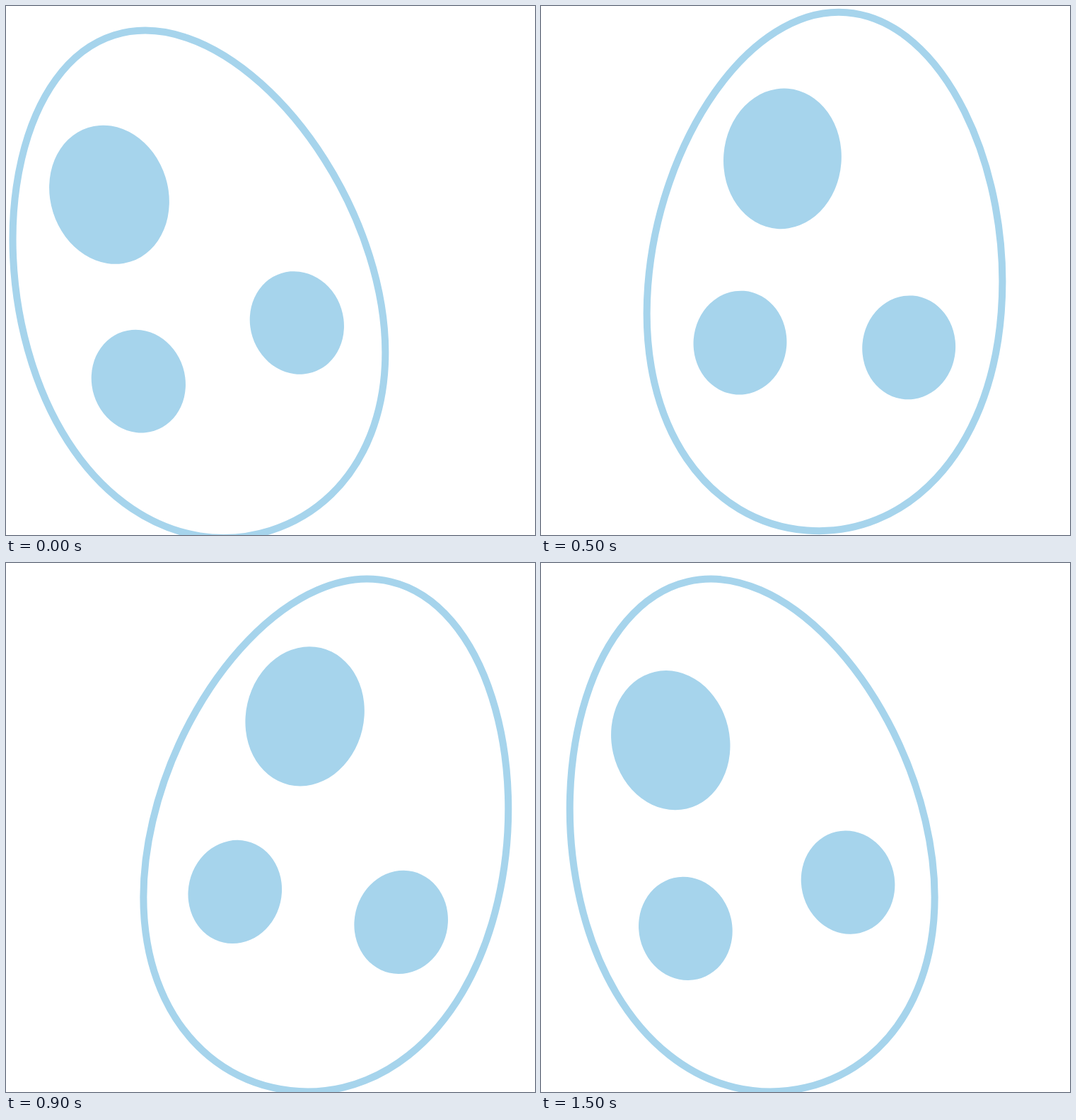
Write an HTML page that moves like this. It is 748x748 px and loops after 1.6 s.

```html
<!DOCTYPE html>
<html lang="en">
<head>
<meta charset="utf-8">
<title>Rocking egg</title>
<style>
  html, body { margin: 0; width: 100%; height: 100%; overflow: hidden; background: #fff; }
  svg { display: block; width: 100vw; height: 100vh; }
</style>
</head>
<body>
<svg viewBox="0 0 748 748">
  <!-- The egg stands on the origin, which is also the pivot -->
  <g id="egg" fill="#a6d4ec">
    <path d="M0-740C138.3-740 250.5-536.8 250.5-334S138.3-5.5 0-5.5S-250.5-131.2-250.5-334S-138.3-740 0-740Z"
          fill="none" stroke="#a6d4ec" stroke-width="10"/>
    <ellipse cx="-74.5" cy="-527" rx="83.3" ry="99.4"/>
    <ellipse cx="-114.4" cy="-262.9" rx="65.9" ry="73.5"/>
    <ellipse cx="124.1" cy="-274.4" rx="65.9" ry="73.5"/>
  </g>
</svg>
<script>
  const egg = document.getElementById('egg');
  const LOOP = 1600, STEP = 100, SWING = 17.5;

  // Linear swing from left to right and back, in held steps
  function draw() {
    const step = Math.floor(performance.now() % LOOP / STEP);
    const angle = SWING * (1 - Math.abs(step - 8) / 4);
    egg.setAttribute('transform', `translate(375.5 747) rotate(${angle})`);
    requestAnimationFrame(draw);
  }
  draw();
</script>
</body>
</html>
```
